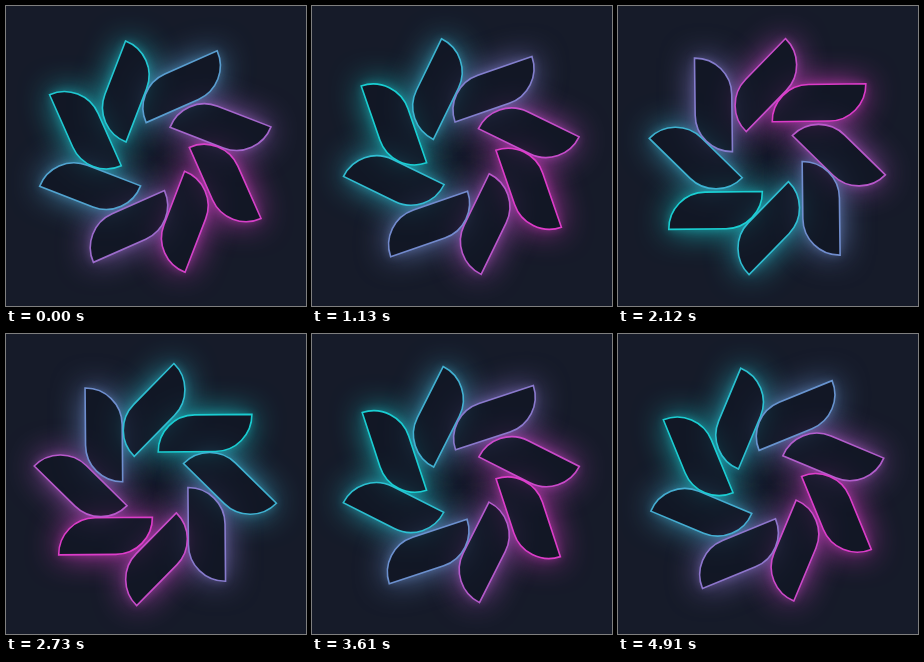
Recreate the animation shown at these times as an HTML page with a canvas. Size 300 by 300 pixels, loop 4960 ms.

```html
<!DOCTYPE html>
<html lang="en">
<head>
<meta charset="utf-8">
<title>Glowing pinwheel</title>
<style>
  html, body { margin: 0; width: 100%; height: 100%; overflow: hidden; background: #161b29; }
  canvas { display: block; width: 300px; height: 300px; }
</style>
</head>
<body>
<canvas id="stage" width="300" height="300"></canvas>
<script>
const LOOP = 4960;
const CENTER = [149.3, 150.6];
const CYAN = [26, 214, 218];
const MAGENTA = [230, 62, 208];
const SPIN = -4.48;     // degrees per step, petals
const CHASE = 17.91;    // degrees per step, colour wave
const GLOWS = [[10, 0.4], [32, 0.8]]; // blur, opacity
const FAR = 1000;
const RAD = Math.PI / 180;

const ctx = document.getElementById('stage').getContext('2d');

function makePetal(k) {
  const out = k % 2 ? 2.2 : 0;
  const path = new Path2D();
  path.roundRect(32.6 + out, 3.2 + out, 36.8, 94, [0, 36.8, 0, 36.8]);
  return path;
}
const petals = Array.from({ length: 8 }, (_, k) => makePetal(k));

// The motion advances in discrete steps, slightly faster at the start.
function stepAt(t) {
  if (t < 50) return 0;
  if (t < 570) return 1 + Math.floor((t - 50) / 57.8);
  return Math.min(80, 10 + Math.floor((t - 556) / 62));
}

function mix(m, alpha) {
  const rgb = CYAN.map((c, i) => Math.round(c + (MAGENTA[i] - c) * m));
  return `rgba(${rgb.join(',')},${alpha})`;
}

function place(angle, dx = 0) {
  ctx.setTransform(1, 0, 0, 1, CENTER[0] + dx, CENTER[1]);
  ctx.rotate(angle * RAD);
}

function drawGlow({ path, angle, m }) {
  ctx.save();
  place(angle);
  const outside = new Path2D();
  outside.rect(-600, -600, 1200, 1200);
  outside.addPath(path);
  ctx.clip(outside, 'evenodd');
  place(angle, -FAR);
  ctx.shadowOffsetX = FAR;
  ctx.fillStyle = '#000';
  for (const [blur, alpha] of GLOWS) {
    ctx.shadowBlur = blur;
    ctx.shadowColor = mix(m, alpha);
    ctx.fill(path);
  }
  ctx.restore();
}

function drawPetal({ path, angle, m }) {
  place(angle);
  ctx.fillStyle = 'rgba(16,22,36,0.7)';
  ctx.fill(path);
  ctx.lineWidth = 1.6;
  ctx.strokeStyle = mix(m, 0.95);
  ctx.stroke(path);
}

function draw(t) {
  const step = stepAt(t);
  const turn = 21.1 + SPIN * step;
  const peak = 41 + CHASE * step;
  const items = petals.map((path, k) => {
    const angle = turn + 45 * k;
    return { path, angle, m: (1 + Math.cos((angle + 45 - peak) * RAD)) / 2 };
  });
  ctx.setTransform(1, 0, 0, 1, 0, 0);
  ctx.fillStyle = '#161b29';
  ctx.fillRect(0, 0, 300, 300);
  items.forEach(drawGlow);
  items.forEach(drawPetal);
}

const start = performance.now();
function tick() {
  draw((performance.now() - start) % LOOP);
  requestAnimationFrame(tick);
}
tick();
</script>
</body>
</html>
```
